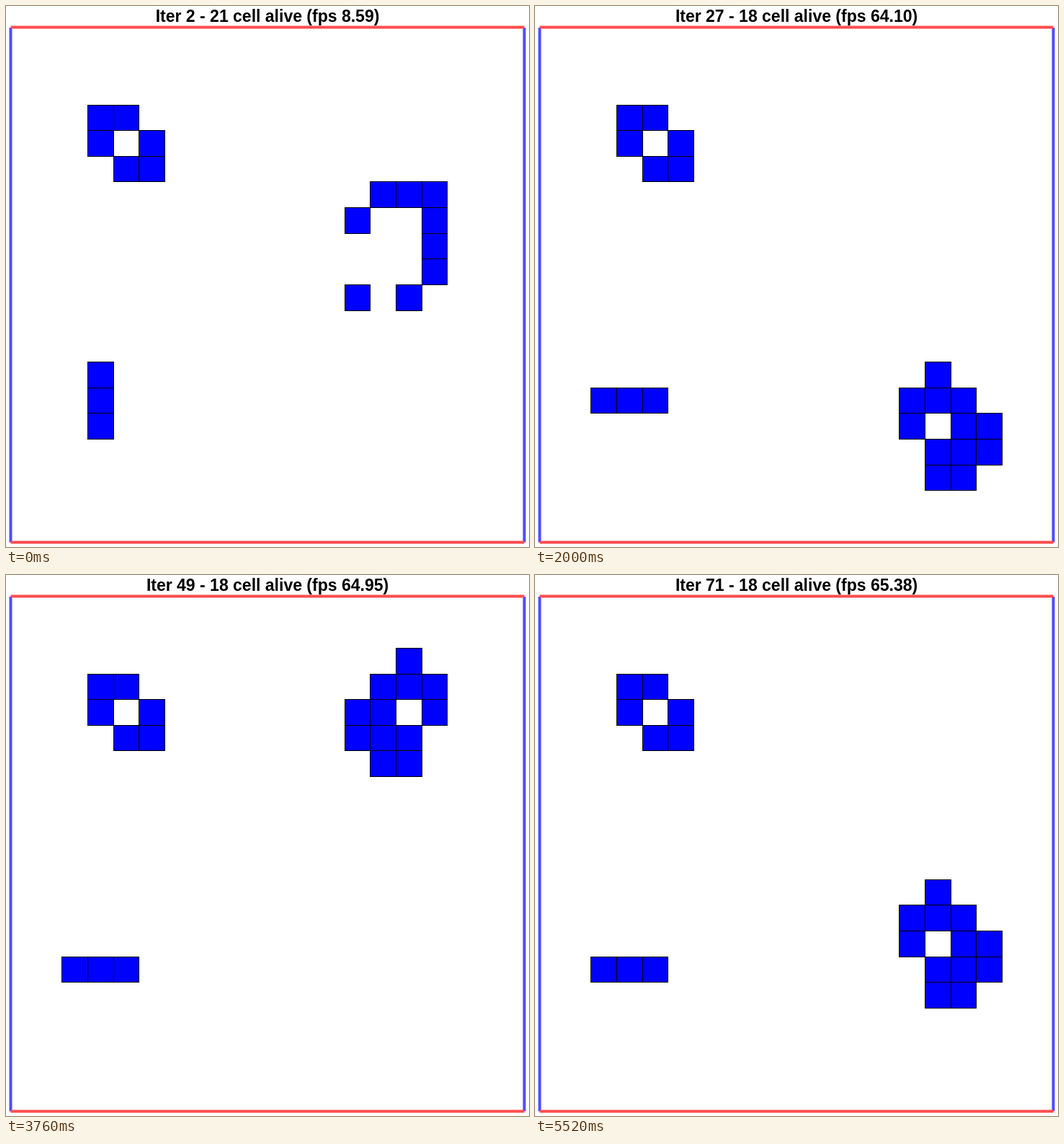
Animation of 726 by 750 pixels, one loop 5600 ms. Source, as an HTML page with a canvas:

```html
<!DOCTYPE html>
<html lang="en">
<head>
<meta charset="utf-8">
<title>Game of Life</title>
<style>
  html, body { margin: 0; width: 100%; height: 100%; overflow: hidden; background: #fff; }
  canvas { display: block; }
</style>
</head>
<body>
<canvas id="stage" width="726" height="750"></canvas>
<script>
const ctx = document.getElementById('stage').getContext('2d');
const SIZE = 20, CELL = 35.66, LEFT = 6.5, TOP = 30.03;
const STEP = 80, STEPS = 70, FIRST_ITER = 2;

const seed = {
  3: [3, 4], 4: [3, 5], 5: [4, 5],
  6: [14, 15, 16], 7: [13, 16], 8: [16], 9: [16], 10: [13, 15],
  13: [3], 14: [3], 15: [3]
};

// Measured speed at a few iterations: [iteration, fps]
const speeds = [[2, 8.59], [3, 34.2], [6, 46.85], [17, 54.68], [27, 64.1],
  [35, 67.33], [44, 63], [55, 67.29], [71, 65.38]];

const wrap = n => (n + SIZE) % SIZE;

function nextGrid(grid) {
  return grid.map((row, y) => row.map((alive, x) => {
    let near = -alive;
    for (let dy = -1; dy <= 1; dy++)
      for (let dx = -1; dx <= 1; dx++) near += grid[wrap(y + dy)][wrap(x + dx)];
    return +(near === 3 || (alive && near === 2));
  }));
}

function fpsAt(iter) {
  const i = Math.max(1, speeds.findIndex(([n]) => n >= iter));
  const [n0, v0] = speeds[i - 1], [n1, v1] = speeds[i];
  return v0 + (v1 - v0) * (iter - n0) / (n1 - n0);
}

const grids = [Array.from({ length: SIZE }, (_, y) =>
  Array.from({ length: SIZE }, (_, x) => +(seed[y] || []).includes(x)))];
while (grids.length < STEPS) grids.push(nextGrid(grids[grids.length - 1]));

function line(color, x0, y0, x1, y1) {
  ctx.strokeStyle = color;
  ctx.lineWidth = 4;
  ctx.beginPath();
  ctx.moveTo(x0, y0);
  ctx.lineTo(x1, y1);
  ctx.stroke();
}

function drawCell(x, y) {
  const px = n => Math.floor(LEFT + n * CELL);
  const py = n => Math.floor(TOP + n * CELL);
  const box = [px(x) + .5, py(y) + .5, px(x + 1) - px(x), py(y + 1) - py(y)];
  ctx.fillStyle = '#00f';
  ctx.fillRect(...box);
  ctx.strokeStyle = '#000';
  ctx.lineWidth = 1;
  ctx.strokeRect(...box);
}

function draw(step) {
  const iter = step + FIRST_ITER;
  // The title counts the generation before the one on screen.
  const count = iter % 2 ? 18 : 21;
  ctx.fillStyle = '#fff';
  ctx.fillRect(0, 0, 726, 750);

  ctx.fillStyle = '#000';
  ctx.font = 'bold 23px "Liberation Sans", Arial, sans-serif';
  ctx.textAlign = 'center';
  ctx.fillText(`Iter ${iter} - ${count} cell alive (fps ${fpsAt(iter).toFixed(2)})`, 363, 22);

  const right = 719.5, bottom = 743.5;
  line('#4d4dff', LEFT, TOP, LEFT, bottom);
  line('#4d4dff', right, TOP, right, bottom);
  line('#ff4d4d', LEFT, 29.5, right, 29.5);
  line('#ff4d4d', LEFT, bottom, right, bottom);

  grids[step].forEach((row, y) => row.forEach((alive, x) => alive && drawCell(x, y)));
}

const start = performance.now();
let shown = -1;
function tick() {
  const step = Math.floor((performance.now() - start) / STEP) % STEPS;
  if (step !== shown) draw(shown = step);
  requestAnimationFrame(tick);
}
tick();
</script>
</body>
</html>
```
